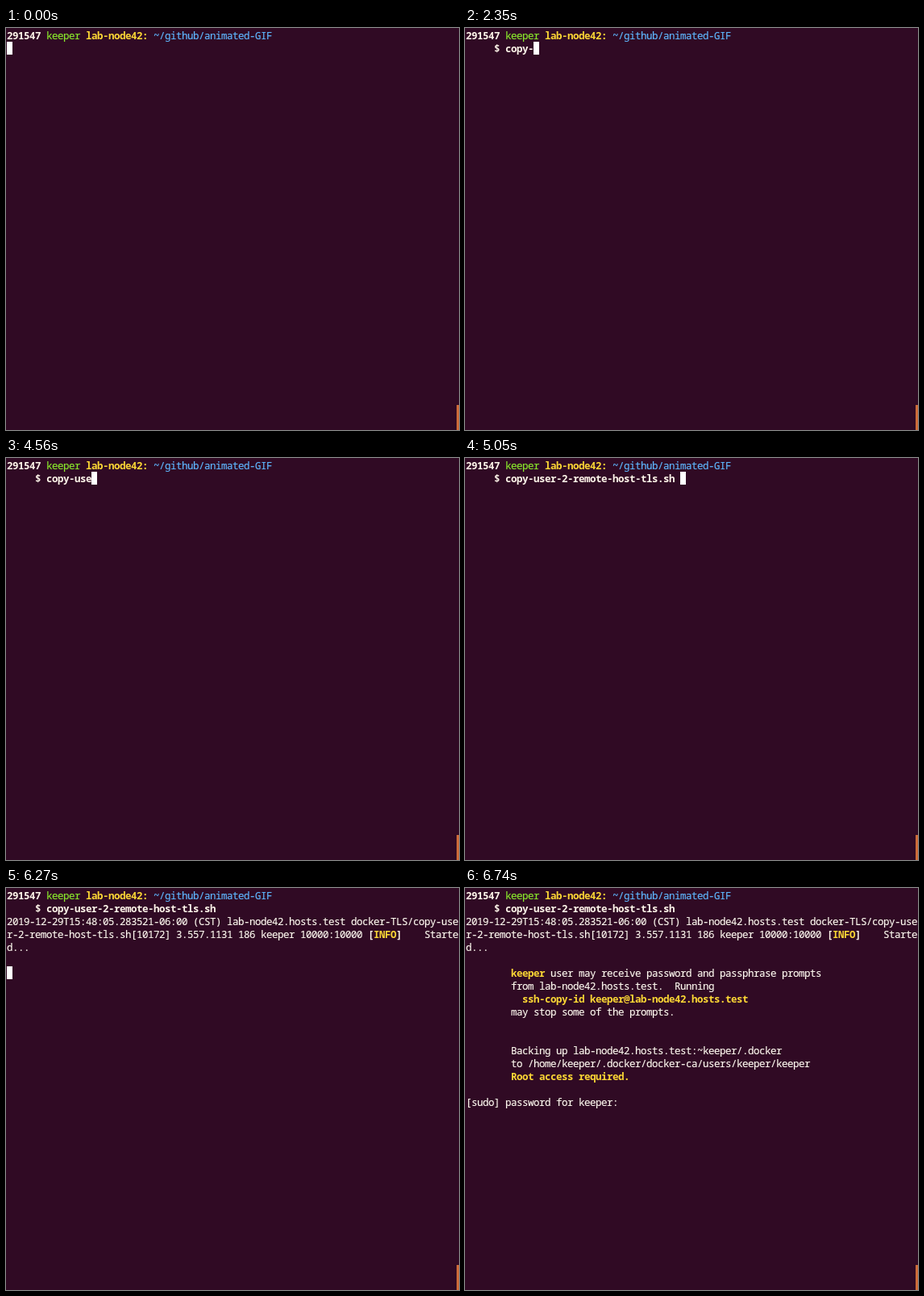
An HTML page that plays this animation: 562 px wide and 498 px high, repeating every 8000 ms.

```html
<!DOCTYPE html>
<html lang="en">
<head>
<meta charset="utf-8">
<title>Terminal session</title>
<style>
  html, body { margin: 0; width: 100%; height: 100%; overflow: hidden; background: #300a24; }
  #screen {
    position: absolute; left: 1px; top: 2px; margin: 0;
    font: 12.5px/16px "Noto Sans Mono", monospace;
    letter-spacing: -.5px; /* 7px terminal cells */
    -webkit-text-stroke: .15px;
    color: #fffaf0; white-space: pre;
  }
  .bold, .gold { font-weight: bold; -webkit-text-stroke: 0; }
  .bold { color: #fff6ea; }
  .gold { color: #fdd835; }
  .green { color: #8aec2c; }
  .blue { color: #5fb8ff; }
  .cursor {
    display: inline-block; position: relative; top: -1px;
    width: 7px; height: 16px; vertical-align: top; background: #fff;
  }
  #thumb { position: absolute; left: 559px; top: 467px; width: 3px; height: 31px; background: #cd6b38; }
</style>
</head>
<body>
<pre id="screen"></pre>
<div id="thumb"></div>
<script>
const LOOP = 8000;
const user = 'keeper', node = 'lab-node42', host = node + '.hosts.test';
const command = 'copy-user-2-remote-host-tls.sh ';
const span = (style, text) => `<span class="${style}">${text}</span>`;
const indent = ' '.repeat(8);

const prompt = `${span('bold', '291547')} ${span('green', user)} ${span('gold', node + ':')} ` +
  span('blue', '~/github/animated-GIF') + '\n';
const typed = count => prompt + span('bold', '     $ ' + command.slice(0, count));

const entered = typed(command.length) + '\n';
const started = entered +
  `2019-12-29T15:48:05.283521-06:00 (CST) ${host} docker-TLS/copy-use\n` +
  `r-2-remote-host-tls.sh[10172] 3.557.1131 186 ${user} 10000:10000 ` +
  `${span('bold', '[')}${span('gold', 'INFO')}${span('bold', ']')}    Starte\nd...\n`;
const spaced = started + '\n';
const advised = spaced + [
  span('gold', user) + ' user may receive password and passphrase prompts',
  `from ${host}.  Running`,
  span('gold', `  ssh-copy-id ${user}@${host}`),
  'may stop some of the prompts.'
].map(line => indent + line + '\n').join('') + '\n';
const backedUp = advised + '\n' + [
  `Backing up ${host}:~${user}/.docker`,
  `to /home/${user}/.docker/docker-ca/users/${user}/${user}`,
  span('gold', 'Root access required.')
].map(line => indent + line + '\n').join('') + '\n';

// [start in ms, text, cursor visible]
const steps = [
  [0, prompt, true],
  [1340, typed(1), true],
  [1540, typed(2), false],
  [1790, typed(3), true],
  [2060, typed(4), true],
  [2350, typed(5), true],
  [4100, typed(6), false],
  [4290, typed(7), true],
  [4560, typed(8), true],
  [4700, typed(9), true],
  [5050, typed(command.length), true],
  [6040, entered, true],
  [6150, started, true],
  [6270, spaced, true],
  [6290, advised, true],
  [6390, backedUp, true],
  [6740, backedUp + `[sudo] password for ${user}:`, false]
];

const screen = document.getElementById('screen');
const origin = performance.now();
let shown;

function draw() {
  const time = (performance.now() - origin) % LOOP;
  const step = steps.filter(([start]) => start <= time).pop();
  if (step !== shown) {
    shown = step;
    screen.innerHTML = step[1] + (step[2] ? span('cursor', '') : '');
  }
  requestAnimationFrame(draw);
}
draw();
</script>
</body>
</html>
```
